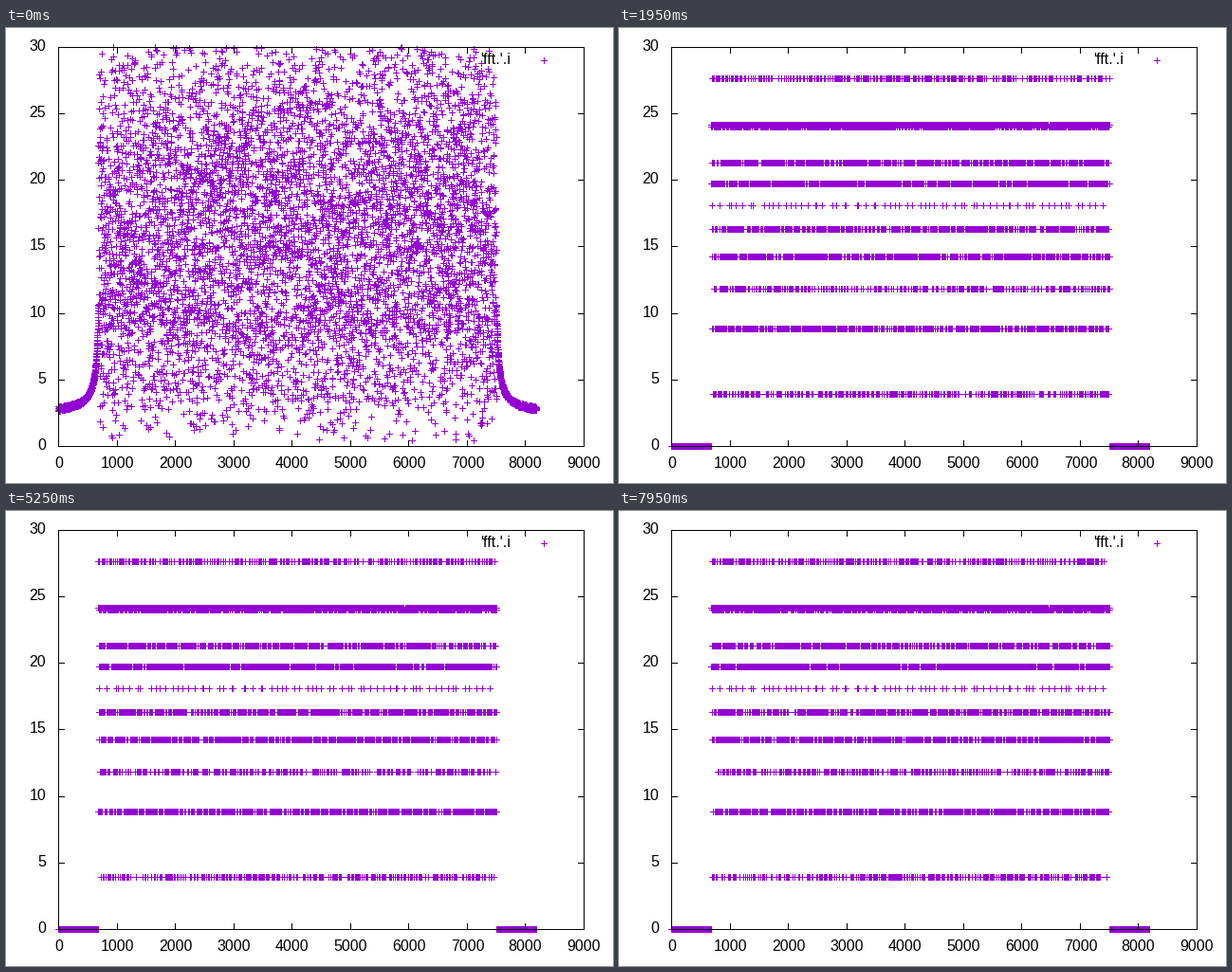
A matplotlib script that plays this animation: 640 px wide and 480 px high, repeating every 8000 ms.

```python
import numpy as np
import matplotlib.pyplot as plt
from matplotlib.animation import FuncAnimation
from matplotlib.path import Path

# OFDM spectrum magnitudes: 64-QAM data, boosted pilots and signalling carriers.
DPI = 100
WIDTH, HEIGHT = 640, 480
LEFT, RIGHT, TOP, BOTTOM = 55, 609, 20, 441
X_MAX, Y_MAX = 9000, 30
TICK = 6
VIOLET = "#9400d3"

FFT_SIZE, CARRIERS, FIRST = 8192, 6817, 688
LEVEL = 18.105
PILOT = LEVEL * 4 / 3
PILOT_STEP, SIGNAL_STEP = 39, 100

INTERVAL, FRAMES, HOLD = 50, 160, 3


def px(points):
    return points * 72 / DPI


def to_x(value):
    return np.rint(LEFT + np.asarray(value) * (RIGHT - LEFT) / X_MAX)


def to_y(value):
    return np.rint(BOTTOM - np.asarray(value) * (BOTTOM - TOP) / Y_MAX)


def scattered(step, rng):
    """Irregular fixed carriers, one in every stretch of the given length."""
    starts = np.arange(0, CARRIERS - step, step)
    return starts + rng.integers(0, step, starts.size)


fixed = np.random.default_rng(7)
continual = scattered(PILOT_STEP, fixed)
signalling = scattered(SIGNAL_STEP, fixed)


def symbol(step, rng):
    """Complex carriers of one symbol."""
    re, im = rng.choice(np.arange(-7, 8, 2), (2, CARRIERS))
    cells = (re + 1j * im) * LEVEL / np.sqrt(42)
    cells[3 * (step % 4)::12] = PILOT
    cells[continual] = PILOT
    cells[[0, -1]] = PILOT
    cells[signalling] = LEVEL
    return cells


def spectrum(step):
    rng = np.random.default_rng(100 + step)
    cells = symbol(step, rng)
    bins = np.arange(FFT_SIZE)
    levels = np.zeros(FFT_SIZE)
    if step == 0:
        # Window not yet aligned: noisy carriers and leakage into the guard bands.
        noise = rng.normal(0, 10, (2, CARRIERS))
        cells = 0.7 * cells + noise[0] + 1j * noise[1]
        gap = np.maximum(FIRST - bins, bins - FIRST - CARRIERS + 1)
        levels = 2.4 + 300 / (np.maximum(gap, 0) + 35)
        levels += rng.uniform(-0.17, 0.17, FFT_SIZE)
    levels[FIRST:FIRST + CARRIERS] = np.abs(cells)
    shown = levels <= Y_MAX
    spots = np.column_stack([to_x(bins[shown]), to_y(levels[shown])])
    return np.unique(spots, axis=0).T


fig = plt.figure(figsize=(WIDTH / DPI, HEIGHT / DPI), dpi=DPI, facecolor="white")
ax = fig.add_axes([0, 0, 1, 1])
ax.set(xlim=(0, WIDTH), ylim=(HEIGHT, 0))
ax.axis("off")

# Seven-pixel cross whose corners lie on the pixel grid.
cross = Path([(-3, -1), (0, -1), (0, -4), (1, -4), (1, -1), (4, -1), (4, 0),
              (1, 0), (1, 3), (0, 3), (0, 0), (-3, 0), (-3, -1)], closed=True)


def crosses(xs, ys):
    return ax.plot(xs, ys, ls="none", marker=cross, ms=px(8), mew=0,
                   color=VIOLET, antialiased=False, zorder=2)[0]


def line(xs, ys):
    ax.plot(xs, ys, color="black", lw=px(1), antialiased=False, zorder=3)


def label(x, y, text, align):
    ax.text(x, y, text, ha=align, va="baseline", color="black", zorder=1,
            family="Liberation Sans", size=px(16))


line([LEFT, RIGHT, RIGHT, LEFT, LEFT], [TOP, TOP, BOTTOM, BOTTOM, TOP])
for value in range(0, X_MAX + 1, 1000):
    x = to_x(value)
    line([x, x], [BOTTOM, BOTTOM - TICK])
    line([x, x], [TOP, TOP + TICK])
    label(x + 0.5, 464, str(value), "center")
for value in range(0, Y_MAX + 1, 5):
    y = to_y(value)
    line([LEFT, LEFT + TICK], [y, y])
    line([RIGHT, RIGHT - TICK], [y, y])
    label(42, y + 4, str(value), "right")
label(532, 38, "'fft.'.i", "right")
crosses([567], [34])
dots = crosses([], [])


def update(frame):
    dots.set_data(*spectrum(frame // HOLD))
    return dots,


anim = FuncAnimation(fig, update, frames=FRAMES, interval=INTERVAL,
                     repeat=True, repeat_delay=0)
plt.show()
```
